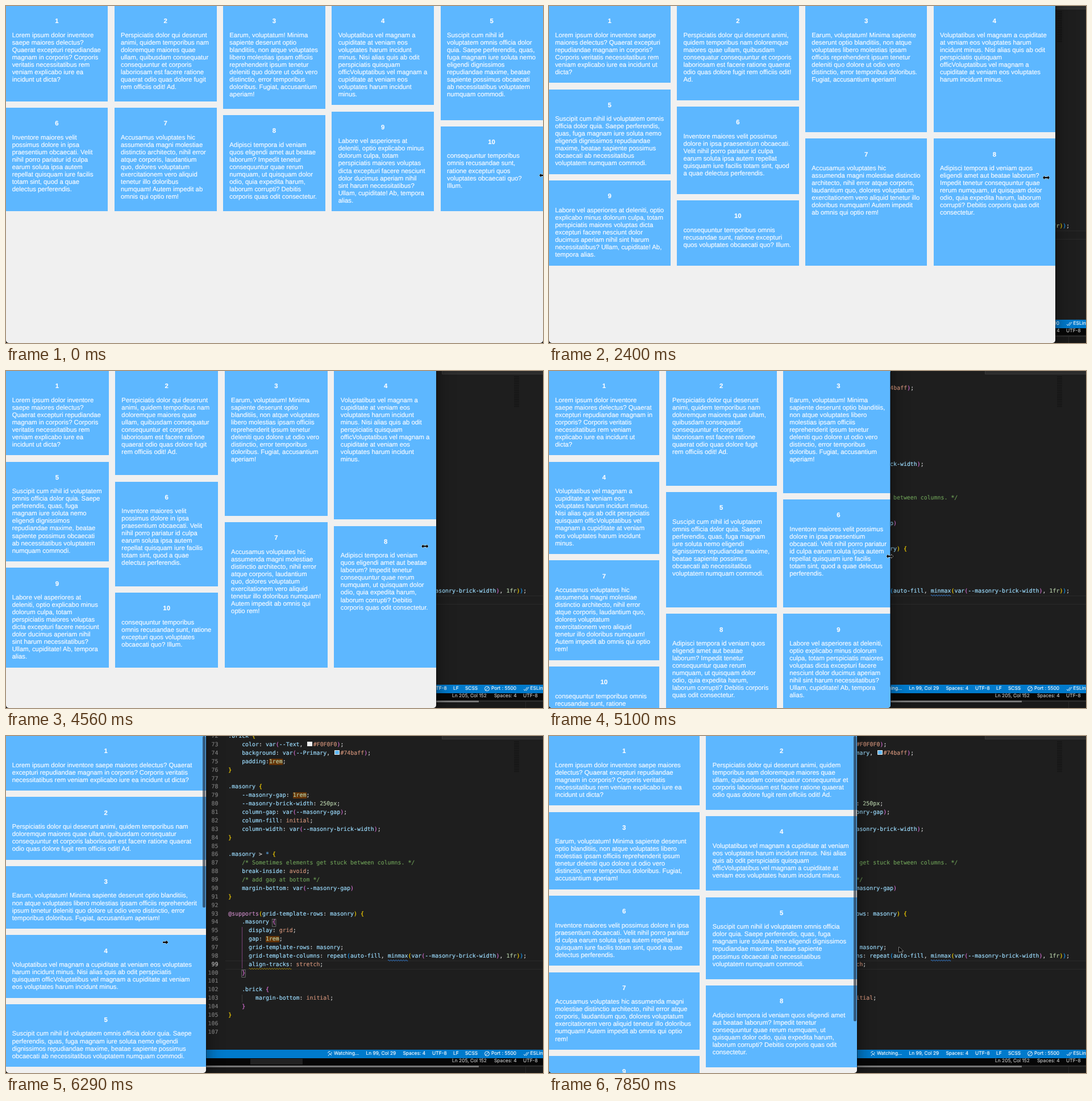
Recreate the animation shown at these times as an HTML page. Size 945 px wide and 593 px high, loop 8 s.

```html
<!DOCTYPE html>
<html lang="en">
<head>
<meta charset="utf-8">
<title>Masonry resize</title>
<style>
  html, body { margin: 0; width: 100%; height: 100%; overflow: hidden; background: #1e1e1e; }
  #stage { position: relative; width: 945px; height: 593px; overflow: hidden; background: #1e1e1e; text-rendering: geometricPrecision; }
  #stage div, #stage svg { position: absolute; }
  #stage svg { left: 0; top: 0; overflow: hidden; }
  .line { height: 14.87px; font: 9.917px/14.87px "DejaVu Sans Mono", monospace; white-space: pre; -webkit-text-stroke: .18px; }
  .num { left: 340px; width: 33.5px; text-align: right; color: #858585; }
  .mark { background: #653306; }
  .swatch { display: inline-block; width: 6.6px; height: 6.6px; margin: 0 1.8px; border: .7px solid #eee; vertical-align: -.4px; }
  .status { font: 8.4px/15px Inter, sans-serif; white-space: pre; color: #fff; -webkit-text-stroke: .12px; }
  #page { left: 0; top: 0; height: 593px; overflow: hidden; background: #f0f0f0; border-radius: 0 0 5px 5px; }
  #shade { left: 0; top: -40px; height: 633px; border-radius: 0 0 5px 5px; box-shadow: 0 0 0 .6px rgba(0,0,0,.7), 0 6px 30px rgba(0,0,0,.5); }
  .card { background: #5db7ff; color: #fafcff; font: 11.33px/13.06px "Liberation Sans", Arial, sans-serif; -webkit-text-stroke: .16px; }
  .card b { position: absolute; top: 22.1px; left: 0; right: 0; text-align: center; }
  .card p { position: absolute; top: 46.5px; left: 11.36px; right: 11.36px; margin: 0; }
  #thumb { top: 0; width: 5.5px; border-radius: 3px; background: rgba(25,35,48,.62); }
</style>
</head>
<body>
<div id="stage">
  <div id="editor"></div>
  <div id="shade"></div>
  <div id="page"><div id="thumb"></div></div>
  <svg width="945" height="593"><path id="cursor" fill="#000" stroke="#fff" stroke-width=".9" paint-order="stroke" stroke-linejoin="round"/></svg>
</div>
<script>
const $ = id => document.getElementById(id);
const px = v => v + 'px';
const add = (parent, cls, css = {}, text = '') => {
  const el = document.createElement('div');
  el.className = cls;
  el.textContent = text;
  Object.assign(el.style, css);
  parent.append(el);
  return el;
};

// ---- Editor behind the browser window ----
const FIRST = 72, ROW = 14.87;
const code = `.brick {
    color: var(--Text, #F0F0F0);
    background: var(--Primary, #74baff);
    padding:1rem;
}

.masonry {
    --masonry-gap: 1rem;
    --masonry-brick-width: 250px;
    column-gap: var(--masonry-gap);
    column-fill: initial;
    column-width: var(--masonry-brick-width);
}

.masonry > * {
    /* Sometimes elements get stuck between columns. */
    break-inside: avoid;
    /* add gap at bottom */
    margin-bottom: var(--masonry-gap)
}

@supports(grid-template-rows: masonry) {
    .masonry {
      display: grid;
      gap: 1rem;
      grid-template-rows: masonry;
      grid-template-columns: repeat(auto-fill, minmax(var(--masonry-brick-width), 1fr));
      align-tracks: stretch;
    }

    .brick {
        margin-bottom: initial;
    }
}

`.split('\n');
const brackets = ['#ffd700', '#da70d6', '#179fff'];
const values = ['avoid', 'initial', 'grid', 'stretch'];
let depth = 0;

function color(tok) {
  if (tok.startsWith('/*')) return '#6a9955';
  if (tok[0] === '@') return '#c586c0';
  if (tok[0] === '#' || values.includes(tok)) return '#ce9178';
  if (/^\d/.test(tok)) return '#b5cea8';
  if (/[({]/.test(tok)) return brackets[depth++ % 3];
  if (/[)}]/.test(tok)) return brackets[--depth % 3];
  if (tok === '*') return '#569cd6';
  return /\w/.test(tok) ? '#9cdcfe' : '#d4d4d4';
}

const rect = (x, y, w, h, fill, extra = '') => `<rect x="${x}" y="${y}" width="${w}" height="${h}" fill="${fill}" ${extra}/>`;
const wave = (x, y, n, c) => `<path d="M${x} ${y}q1.1 -2.4 2.2 0${'t2.2 0'.repeat(n)}" fill="none" stroke="${c}" stroke-width=".8"/>`;
const stroke = (d, c = '#fff') => `<path d="${d}" fill="none" stroke="${c}" stroke-width=".9"/>`;
const frameBox = y => rect(414.8, y, 6.4, 13, 'none', 'stroke="#888" stroke-width=".7"');

function buildEditor() {
  const ed = $('editor');
  let minimap = '';
  for (let y = 9; y < 62; y += 3.1) minimap += rect(894, y, 9, 1.6, '#151515');
  ed.innerHTML = `<svg width="945" height="593">
    ${rect(767, 0, 178, 5, '#2c2c2c')}${stroke('M767.5 0V5.5H945', '#3c3c3c')}${minimap}
    ${stroke('M386 395.7H945M386 410.4H945', '#2d2d2d')}
    ${stroke('M415.6 336V409', '#8a4a88')}${stroke('M415.6 455V469', '#404040')}
    <g transform="translate(53.7 -89.3)">${frameBox(411.5)}</g>${frameBox(411.5)}
    ${wave(672, 395, 15, '#3794ff')}${wave(427.5, 409.6, 33, '#cca700')}
    ${rect(0, 552, 945, 15, '#007acc')}${rect(0, 567, 945, 12, '#070707')}
    ${rect(430, 568, 92, 10, '#222')}${rect(0, 579, 945, 14, '#191919')}
    ${rect(0, 580, 832, 3, '#777')}${rect(832, 580, 113, 2, '#2c2c2c')}${stroke('M914.5 582V593', '#2b2b2b')}
    ${stroke('M567 563l3 -4M569 558a2 2 0 1 0 3 -2M566.5 558a3.6 3.6 0 0 1 4 -3M570 559l3 3')}
    <circle cx="846.5" cy="559" r="4" fill="none" stroke="#fff" stroke-width=".9"/>${stroke('M843.7 562l5.6 -6')}
    ${stroke('M911 560l2 2.3 4.4 -6M915 562l.6 .4 4.7 -6.4')}
  </svg>`;
  code.forEach((text, i) => {
    const n = FIRST + i, top = px(9.1 + (i - 1) * ROW);
    add(ed, 'line num', { top, color: n === 99 ? '#c6c6c6' : '' }, n);
    const row = add(ed, 'line', { top, left: '391.3px' });
    for (const tok of text.match(/\/\*.*?\*\/|[@#]\w+|[\w.-]+|\s+|./g) || []) {
      const span = document.createElement('span');
      if (tok[0] === '#') {
        const box = document.createElement('span');
        box.className = 'swatch';
        box.style.background = tok === '#74baff' ? '#5db7ff' : tok;
        row.append(box);
      }
      if (tok === '1rem') span.className = 'mark';
      span.textContent = tok;
      span.style.color = color(tok);
      row.append(span);
    }
  });
  const status = (top, color, items) => Object.entries(items)
    .forEach(([s, x]) => add(ed, 'status', { left: px(x), top: px(top), color }, s));
  status(552, '#fff', { 'Watching...': 577, 'Ln 99, Col 29': 633.5, 'Spaces: 4': 698.5, 'UTF-8': 750,
    'LF': 787, 'SCSS': 808, 'Port : 5500': 854, 'ESLint': 922.5 });
  status(565, '#c8c8c8', { 'Ln 205, Col 152': 785, 'Spaces: 4': 859, 'UTF-8': 910 });
}

// ---- Masonry page ----
const GAP = 11.36, MIN = 177.5, LINE = 13.06, BASE = 57.9, LEFT = -.7, TOP = -1;
const texts = [
  'Lorem ipsum dolor inventore saepe maiores delectus? Quaerat excepturi repudiandae magnam in corporis? Corporis veritatis necessitatibus rem veniam explicabo iure ea incidunt ut dicta?',
  'Perspiciatis dolor qui deserunt animi, quidem temporibus nam doloremque maiores quae ullam, quibusdam consequatur consequuntur et corporis laboriosam est facere ratione quaerat odio quas dolore fugit rem officiis odit! Ad.',
  'Earum, voluptatum! Minima sapiente deserunt optio blanditiis, non atque voluptates libero molestias ipsam officiis reprehenderit ipsum tenetur deleniti quo dolore ut odio vero distinctio, error temporibus doloribus. Fugiat, accusantium aperiam!',
  'Voluptatibus vel magnam a cupiditate at veniam eos voluptates harum incidunt minus. Nisi alias quis ab odit perspiciatis quisquam officVoluptatibus vel magnam a cupiditate at veniam eos voluptates harum incidunt minus.',
  'Suscipit cum nihil id voluptatem omnis officia dolor quia. Saepe perferendis, quas, fuga magnam iure soluta nemo eligendi dignissimos repudiandae maxime, beatae sapiente possimus obcaecati ab necessitatibus voluptatem numquam commodi.',
  'Inventore maiores velit possimus dolore in ipsa praesentium obcaecati. Velit nihil porro pariatur id culpa earum soluta ipsa autem repellat quisquam iure facilis totam sint, quod a quae delectus perferendis.',
  'Accusamus voluptates hic assumenda magni molestiae distinctio architecto, nihil error atque corporis, laudantium quo, dolores voluptatum exercitationem vero aliquid tenetur illo doloribus numquam! Autem impedit ab omnis qui optio rem!',
  'Adipisci tempora id veniam quos eligendi amet aut beatae laborum? Impedit tenetur consequuntur quae rerum numquam, ut quisquam dolor odio, quia expedita harum, laborum corrupti? Debitis corporis quas odit consectetur.',
  'Labore vel asperiores at deleniti, optio explicabo minus dolorum culpa, totam perspiciatis maiores voluptas dicta excepturi facere nesciunt dolor ducimus aperiam nihil sint harum necessitatibus? Ullam, cupiditate! Ab, tempora alias.',
  'consequuntur temporibus omnis recusandae sunt, ratione excepturi quos voluptates obcaecati quo? Illum.'
];
const cards = texts.map((text, i) => {
  const el = add($('page'), 'card');
  el.innerHTML = `<b>${i + 1}</b><p>${text}</p>`;
  $('page').insertBefore(el, $('thumb'));
  return el;
});

function layout(width) {
  const n = Math.max(1, Math.floor((width + GAP) / (MIN + GAP)));
  const w = (width - GAP * (n - 1)) / n;
  cards.forEach(c => c.style.width = px(w));
  const cols = Array.from({ length: n }, () => ({ h: -GAP, items: [] }));
  cards.forEach(el => {
    const h = BASE + LINE * Math.round(el.lastChild.offsetHeight / LINE);
    let best = cols[0];
    for (const c of cols) if (c.h < best.h - .1) best = c;
    best.items.push({ el, h });
    best.h += h + GAP;
  });
  const total = Math.max(...cols.map(c => c.h));
  // Spare height is shared evenly by the cards of a column.
  cols.forEach((col, i) => {
    const extra = (total - col.h) / col.items.length;
    let y = TOP;
    for (const { el, h } of col.items) {
      Object.assign(el.style, { left: px(LEFT + i * (w + GAP)), top: px(y), height: px(h + extra) });
      y += h + extra + GAP;
    }
  });
  const thumb = $('thumb').style;
  thumb.display = total > 593 ? '' : 'none';
  thumb.left = px(LEFT + width - 6.4);
  thumb.height = px(593 * 593 / total);
}

// ---- Motion: the mouse moves in steps and the window edge follows one step behind ----
const LOOP = 8000, NARROW = 352, RELEASED = 542;
const clock = [[0, 0], [1130, 0], [1260, 0], [2820, 12], [5780, 34], [7850, 51]];
const mouseX = [[0, 944.5], [1, 932], [2, 921], [6, 892], [8, 891], [9, 875], [11, 858], [13, 858], [16, 822], [18, 822],
  [19, 805], [21, 777.5], [23, 777.5], [27, 697], [28, 600.5], [30, 599], [32, 490], [33, 490], [34, 404], [38, 280.5],
  [41, 283], [46, 396], [49, 542], [51, 616]];
const mouseY = [[0, 298], [9, 302], [24, 304], [29, 326], [38, 363], [51, 371]];
const shapes = {
  both: 'M-6 0L-2.8 -3.4V-1.2H2.8V-3.4L6 0L2.8 3.4V1.2H-2.8V3.4Z',
  right: 'M-4.5 -1.2H1V-3.4L5 0L1 3.4V1.2H-4.5Z',
  arrow: 'M0 0V10L2.4 7.8L4 11.5L5.7 10.8L4.1 7.2H7.3Z'
};

function at(keys, t) {
  const i = keys.findIndex(key => key[0] > t);
  if (i < 1) return (i ? keys[keys.length - 1] : keys[0])[1];
  const [a, va] = keys[i - 1], [b, vb] = keys[i];
  return va + (vb - va) * (t - a) / (b - a);
}
const edgeAt = step => {
  const x = Math.max(NARROW, at(mouseX, step - 1));
  return step > 49 ? Math.min(RELEASED, x) : x;
};

function draw(step) {
  const edge = edgeAt(step), x = at(mouseX, step);
  $('page').style.width = $('shade').style.width = px(edge);
  // Page layout trails the edge by a little of its last move.
  layout(edge + .8 + .065 * (edgeAt(step - 1) - edge));
  const shape = step > 49 ? 'arrow' : x < NARROW ? 'right' : 'both';
  $('cursor').setAttribute('d', shapes[shape]);
  $('cursor').setAttribute('transform', `translate(${x} ${at(mouseY, step)})`);
}

let shown = -1;
const start = performance.now();
function frame(now) {
  const t = Math.max(0, now - start) % LOOP;
  const step = Math.floor(at(clock, t) + .25);
  if (step !== shown) draw(shown = step);
  requestAnimationFrame(frame);
}

buildEditor();
draw(0);
requestAnimationFrame(frame);
</script>
</body>
</html>
```
